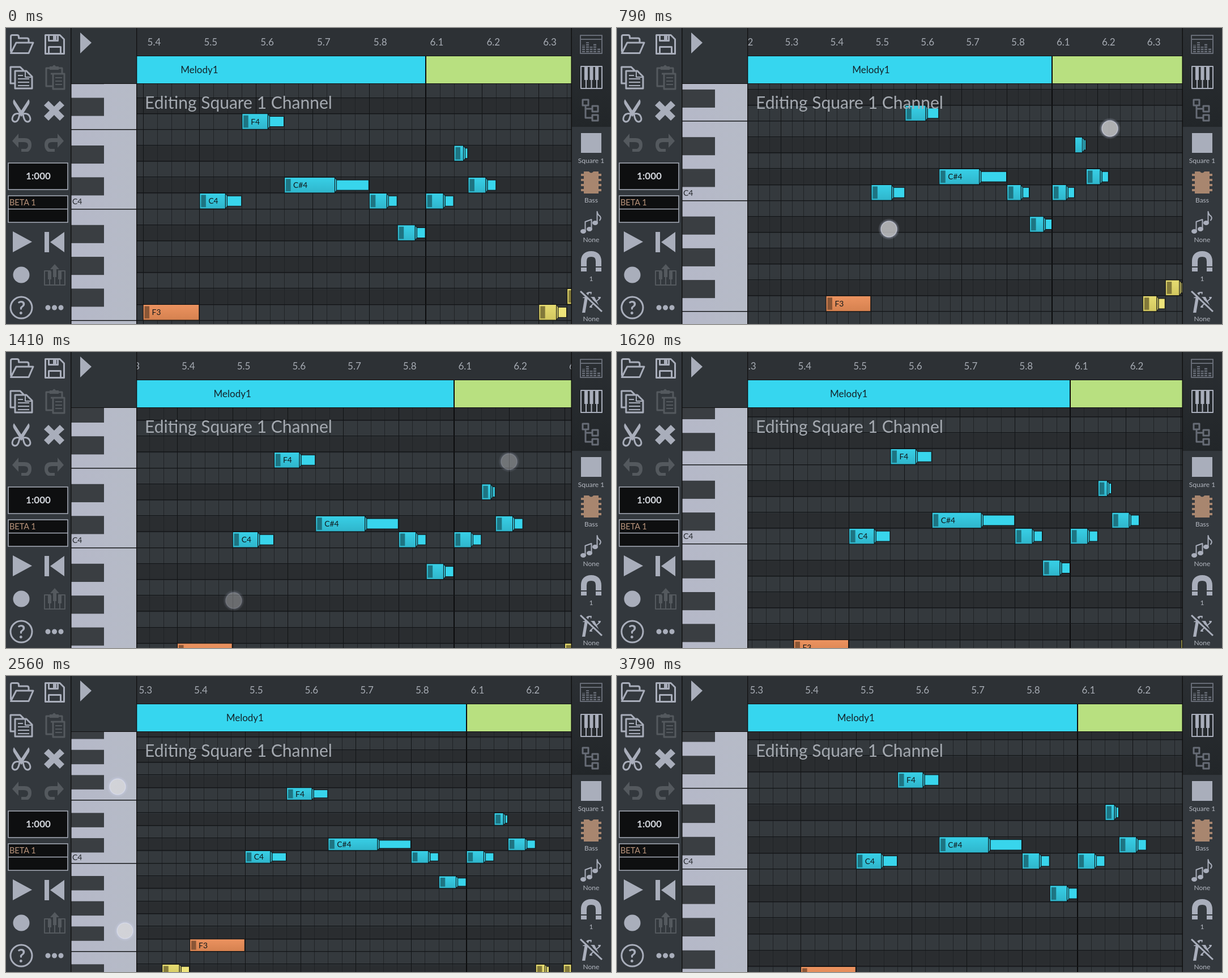
Write an HTML page with a canvas that moves like this. It is 1068 by 524 pixels and loops after 4.05 s.

```html
<!DOCTYPE html>
<html lang="en">
<head>
<meta charset="utf-8">
<title>Piano roll</title>
<style>
html, body { margin: 0; width: 100%; height: 100%; overflow: hidden; background: #33383d; }
canvas, svg { position: absolute; left: 0; top: 0; width: 1068px; height: 524px; }
text { font-family: Lato, sans-serif; }
.on { --c: #a9aebb; }
.off { --c: #54595e; }
.dim { --c: #676c76; }
.f { fill: var(--c); }
.s { fill: none; stroke: var(--c); stroke-width: 3; stroke-linejoin: round; }
.thin { stroke-width: 2; }
.label { fill: #b3b7c0; font-size: 12px; text-anchor: middle; }
</style>
</head>
<body>
<canvas id="roll" width="1068" height="524"></canvas>
<svg viewBox="0 0 1068 524">
  <defs>
    <linearGradient id="shade" x2="0" y2="1">
      <stop stop-color="#2b2f33"/><stop offset="1" stop-color="#222629"/>
    </linearGradient>
    <path id="back" d="M11 200l11-13v8h11q12 0 12 12 0 8-6 12h-12v-5h8q4-2 4-6 0-6-7-6H22v10z"/>
    <path id="blade" d="M14 126l17 26-4 5-13-21q-3-5 0-10z"/>
    <path id="ring" d="M24 152q-9-2-12 5t3 9q7 1 9-14z"/>
  </defs>
  <path fill="#33383d" d="M0 0h114v524H0zM999 0h69v524h-69z"/>
  <path fill="url(#shade)" d="M999 0h69v175h-69z"/>
  <path fill="#111" d="M114 0h1.5v524h-1.5zM997.5 0h1.5v524h-1.5z"/>

  <g class="on">
    <path class="s" d="M8.500 42V15q0-2.500 3-2.500h8q3 0 3 3V18H37q3 0 3 3v5M18 26h30L40 44.500H8.500z"/>
    <path class="s" d="M69.500 12.500H95l7.500 7.500v25.500h-33zM75.500 45V33.500h21V45M75.500 13v9.500h16V13"/>
    <path class="f" d="M83 14h6v8h-6z"/>
    <path class="s" d="M15 98H8V69h17l6 6M16 76h20l10 10v21H16z"/>
    <path class="s thin" d="M34 77v10h11M21 84h9M21 90h20M21 96h20M21 102h20"/>
    <g class="f"><use href="#blade"/><use href="#blade" transform="matrix(-1 0 0 1 54 0)"/></g>
    <g class="s"><use href="#ring"/><use href="#ring" transform="matrix(-1 0 0 1 54 0)"/></g>
    <path class="f" d="M75 129l10 10 10-10 8 8-10 9 10 10-8 8-10-10-10 10-8-8 10-10-10-9z"/>
    <path class="f" d="M12 360l34 18.500-34 18.500zM68 361h8v36h-8zM103 361v36L78 379z"/>
    <circle class="f" cx="27" cy="437" r="14.500"/>
    <circle class="s" cx="27" cy="495" r="19"/>
    <text class="f" x="27" y="506.500" font-size="32" font-weight="bold" text-anchor="middle">?</text>
    <path d="M74 495h.01M85.500 495h.01M97 495h.01" stroke="#a9aebb" stroke-width="9" stroke-linecap="round"/>
    <path class="f" d="M131 8l20 18-20 19z"/>
  </g>

  <g class="off">
    <path class="s" d="M82 103H71V71h28v9M79 81h24v27H83V81"/>
    <path class="f" d="M77 68h5q3-5 6 0h5v6H77z"/>
    <path class="s thin" d="M87 88h12M87 94h12M87 100h12"/>
    <g class="f"><use href="#back"/><use href="#back" transform="matrix(-1 0 0 1 113 0)"/></g>
    <path class="s thin" d="M79 430H68v25h36v-25H92M77 431v24M86 441v14M95 431v24"/>
    <path class="f" d="M86 418l8 9h-5v14h-6v-14h-5zM74 431h6v14h-6zM92 431h6v14h-6z"/>
  </g>

  <g fill="#0e0f10" stroke="#a9aebb" stroke-width="1.500">
    <path d="M4 239h105v47H4zM4 297h105v47H4zM4 320.500h105"/>
  </g>
  <text x="57" y="268" font-size="17" font-weight="bold" text-anchor="middle" fill="#d3d6dc">1:000</text>
  <text x="6" y="314" font-size="14.500" fill="#b9947b">BETA 1</text>

  <g class="dim">
    <path class="s thin" d="M1014 13h38v32h-38zM1014 20h38"/>
    <path class="s" stroke-dasharray="2.500 1.500" d="M1019.500 43V30M1026.500 43V25M1033 43V33M1039.500 43V28M1046.500 43V35" style="stroke-width:5"/>
    <path class="s" d="M1018 127h10v10h-10zM1035 138h10v10h-10zM1035 154h10v10h-10zM1023 137v22h12M1023 143h12"/>
  </g>

  <g class="on">
    <path class="s thin" d="M1015 68h37v39h-37zM1024 68v39M1033.500 68v39M1043 68v39"/>
    <path class="f" d="M1021 68h6v24h-6zM1030.500 68h6v24h-6zM1040 68h6v24h-6z"/>
    <path class="f" d="M1015 186h36v35h-36z"/>
    <path fill="#a8866f" d="M1020 254h9q4 5 8 0h9v39h-26z"/>
    <path stroke="#a8866f" stroke-width="4" d="M1015 260h36M1015 269h36M1015 278h36M1015 287h36"/>
    <g class="f">
      <ellipse cx="1019" cy="360" rx="5" ry="4"/>
      <ellipse cx="1030" cy="356" rx="5" ry="4"/>
      <ellipse cx="1040" cy="345" rx="5" ry="4"/>
    </g>
    <path class="s thin" d="M1022.500 360v-17l11-4v17M1043.500 345v-20q1 6 5 8 3 4-1 8"/>
    <path class="s" style="stroke-width:10" d="M1020 431v-18q0-13 13-13t13 13v18"/>
    <path d="M1014 423h12M1040 423h12" stroke="#33383d" stroke-width="2"/>
    <text class="f" x="1034" y="495" font-size="41" font-weight="bold" font-style="italic" text-anchor="middle" style="font-family:'Liberation Serif',serif">fx</text>
    <path d="M1016 464l38 36" stroke="#33383d" stroke-width="3"/>
    <path class="s" d="M1014 466l38 36"/>
  </g>
  <g class="label">
    <text x="1033" y="239">Square 1</text>
    <text x="1033" y="309">Bass</text>
    <text x="1033" y="379">None</text>
    <text x="1033" y="448">1</text>
    <text x="1033" y="519">None</text>
  </g>
</svg>
<script>
const g = document.getElementById('roll').getContext('2d');
const LOOP = 4050, STEP = LOOP / 60;
const LEFT = 231, RIGHT = 998, TOP = 98, BOTTOM = 524;
const WIDTH = RIGHT - LEFT, HEIGHT = BOTTOM - TOP;

// step, x of bar 6, beat width, bottom of row C4, row height
const view = [
  [6, 740.6, 99.8, 320.6, 28.15],
  [12, 768, 79.9, 305.6, 28.1],
  [21, 790.5, 97.7, 346.6, 28.2],
  [28, 812.6, 97.7, 332.3, 28.15],
  [33, 812.6, 97.7, 332.3, 28.15],
  [38, 812.6, 97.7, 331.7, 22.33],
  [42, 812.6, 97.7, 331, 18.5],
  [47, 812.6, 97.7, 329.7, 19.9],
  [56, 812.6, 97.7, 342.2, 28.7]
];

// each gesture: step, then both finger positions
const gestures = [
  [[7, 440, 346, 895, 170], [12, 480, 356, 870, 178], [21, 402, 440, 888, 194]],
  [[34, 196, 178, 214, 470], [38, 197, 196, 210, 451], [42, 198, 212, 195, 420],
    [47, 199, 160, 181, 433], [55, 196, 112, 185, 490]]
];

// name and length in quarter beats, one after the other
const score = 'D#3:2 F3:4 C4:3 F4:3 C#4:6 C4:2 A#3:2 C4:2 D#4:1 C#4:2 D#3:1 -:1 D#3:1 F3:2 F#3:2';
const FIRST = -5.5;
const pitches = ['C', 'C#', 'D', 'D#', 'E', 'F', 'F#', 'G', 'G#', 'A', 'A#', 'B'];

// top, bottom, grip and tail
const cyan = ['#38d0e7', '#2fb5cb', '#1e7482', '#38d5ec'];
const orange = ['#ec9360', '#d5814f', '#8a5636', '#ec9360'];
const yellow = ['#e6dc72', '#d2c75f', '#82793a', '#eee47a'];

let beat = FIRST;
const notes = score.split(' ').map(item => {
  const [name, quarters] = item.split(':'), length = quarters / 4, start = beat;
  const row = pitches.indexOf(name.slice(0, -1)) + 12 * (name.slice(-1) - 4);
  beat += length;
  const body = length === 1 ? 1 : length * .58 + .03;
  const colors = length === 1 ? orange : row < -5 ? yellow : cyan;
  return { name, row, start, length, body, colors };
}).filter(n => n.name !== '-');

const mod = (a, n) => ((a % n) + n) % n;
const clamp = v => Math.max(0, Math.min(1, v));
const isBlack = row => pitches[mod(row, 12)].length > 1;

function at(keys, t) {
  const last = keys.length - 1, i = keys.findIndex(k => k[0] > t);
  const b = keys[i < 0 ? last : i], a = keys[i < 0 ? last : Math.max(0, i - 1)];
  const p = a === b ? 0 : (t - a[0]) / (b[0] - a[0]);
  return a.slice(1).map((v, j) => v + (b[j + 1] - v) * p);
}

function rect(x, y, w, h, color) {
  g.fillStyle = color;
  g.fillRect(x, y, w, h);
}

function text(s, x, y, size, color, align = 'left') {
  g.font = size + 'px Lato, sans-serif';
  g.textAlign = align;
  g.fillStyle = color;
  g.fillText(s, x, y);
}

function clipped(x, y, w, h, paint) {
  g.save();
  g.beginPath();
  g.rect(x, y, w, h);
  g.clip();
  paint();
  g.restore();
}

function shape(points, color) {
  g.beginPath();
  points.forEach(([x, y]) => g.lineTo(x, y));
  g.closePath();
  g.fillStyle = color;
  g.fill();
  g.strokeStyle = '#0c0e10';
  g.lineWidth = 1;
  g.stroke();
}

const box = (x, y, r, b, color) => shape([[x, y], [r, y], [r, b], [x, b]], color);

function drawNote(n, x0, w, y0, h) {
  const [light, deep, grip, tail] = n.colors;
  const x = x0 + n.start * w + .5, top = y0 - (n.row + 1) * h, bottom = top + h - .5;
  const end = x + n.body * w - 1, last = x + n.length * w - 1, inset = h * .17;
  const fill = g.createLinearGradient(0, top, 0, bottom);
  fill.addColorStop(0, light);
  fill.addColorStop(1, deep);
  if (n.body < n.length) {
    box(end + 3, top + inset, last, bottom - inset, tail);
    shape([[end, top], [end + 3, top + inset], [end + 3, bottom - inset], [end, bottom]], light);
  }
  box(x, top, end, bottom, fill);
  if (end - x > 14) rect(x + 2.5, top + 3, 8.5, h - 6.5, grip);
  if (end - x > 41) text(n.name, x + 15.5, (top + bottom) / 2 + 5, 13.8, '#10181b');
}

function drawGrid(x0, w, y0, h) {
  const low = Math.floor((y0 - BOTTOM) / h) - 1, high = Math.ceil((y0 - TOP) / h);
  for (let r = low; r <= high; r++)
    rect(LEFT, y0 - (r + 1) * h, WIDTH, h + 1, isBlack(r) ? '#2a2d30' : '#34393d');
  for (let q = Math.ceil((LEFT - x0) / w * 4); x0 + q * w / 4 < RIGHT; q++) {
    const x = Math.round(x0 + q * w / 4);
    if (!q) rect(x - 1, TOP, 2, HEIGHT, '#0b0c0d');
    else rect(x, TOP, 1, HEIGHT, q % 4 ? '#202326' : '#111315');
  }
  for (let r = low; r <= high; r++) rect(LEFT, Math.round(y0 - r * h) - 1, WIDTH, 1.3, '#131517');
  notes.forEach(n => drawNote(n, x0, w, y0, h));
}

function drawKeys(y0, h) {
  const fill = g.createLinearGradient(115, 0, 230, 0);
  fill.addColorStop(0, '#b5b8c8');
  fill.addColorStop(1, '#b6bbc7');
  rect(115, TOP, 115, HEIGHT, fill);
  for (let r = Math.floor((y0 - BOTTOM) / h) - 1; y0 - r * h > TOP - h; r++) {
    if (isBlack(r)) rect(115, y0 - (r + 1) * h, 58, h * 1.14, '#3a3e42');
    if ([0, 5].includes(mod(r, 12))) rect(115, Math.round(y0 - r * h) - 1, 115, 1.5, '#16181a');
  }
  text('C4', 117, y0 - h / 2 + 5, 14, '#25282c');
}

function drawHeader(x0, w) {
  rect(LEFT, 0, WIDTH, 49, '#2d3135');
  rect(LEFT, 50, x0 - LEFT, 48, '#36d6ef');
  rect(x0, 50, RIGHT - x0, 48, '#b8e080');
  rect(LEFT, 49, WIDTH, 1, '#111');
  rect(Math.round(x0) - 1, 50, 2, 48, '#0b0c0d');
  text('Melody1', x0 - 4 * w, 80, 17, '#14232a', 'center');
  for (let i = -8; i < 4; i++)
    text(`${i < 0 ? 5 : 6}.${mod(i, 8) + 1}`, x0 + i * w + 8, 31, 17, '#a6abb3');
}

function drawFinger(x, y, alpha) {
  const glow = g.createRadialGradient(x, y, 0, x, y, 19);
  glow.addColorStop(0, 'rgba(220,220,222,.72)');
  glow.addColorStop(.66, 'rgba(220,220,222,.72)');
  glow.addColorStop(.73, 'rgba(222,225,240,.85)');
  glow.addColorStop(.8, 'rgba(205,210,235,.3)');
  glow.addColorStop(1, 'rgba(205,210,235,0)');
  g.globalAlpha = alpha;
  rect(x - 20, y - 20, 40, 40, glow);
  g.globalAlpha = 1;
}

function draw(now) {
  const t = Math.floor(now % LOOP / STEP + .3);
  const [x0, w, y0, h] = at(view, t);
  rect(0, 0, 1068, 524, '#2f3438');
  clipped(LEFT, TOP, WIDTH, HEIGHT, () => drawGrid(x0, w, y0, h));
  clipped(115, TOP, 115, HEIGHT, () => drawKeys(y0, h));
  clipped(LEFT, 0, WIDTH, TOP, () => drawHeader(x0, w));
  rect(115, 98, 883, 1, '#111');
  rect(230, 0, 1.3, 524, '#111');
  text('Editing Square 1 Channel', 245, 143, 30, '#a4a9b0');
  for (const keys of gestures) {
    const from = keys[0][0], to = keys[keys.length - 1][0];
    const [ax, ay, bx, by] = at(keys, t), alpha = clamp(t - from + 1) * clamp((to + 1 - t) / 2);
    drawFinger(ax, ay, alpha);
    drawFinger(bx, by, alpha);
  }
}

const begin = performance.now();
function frame() {
  draw(performance.now() - begin);
  requestAnimationFrame(frame);
}
frame();
</script>
</body>
</html>
```
